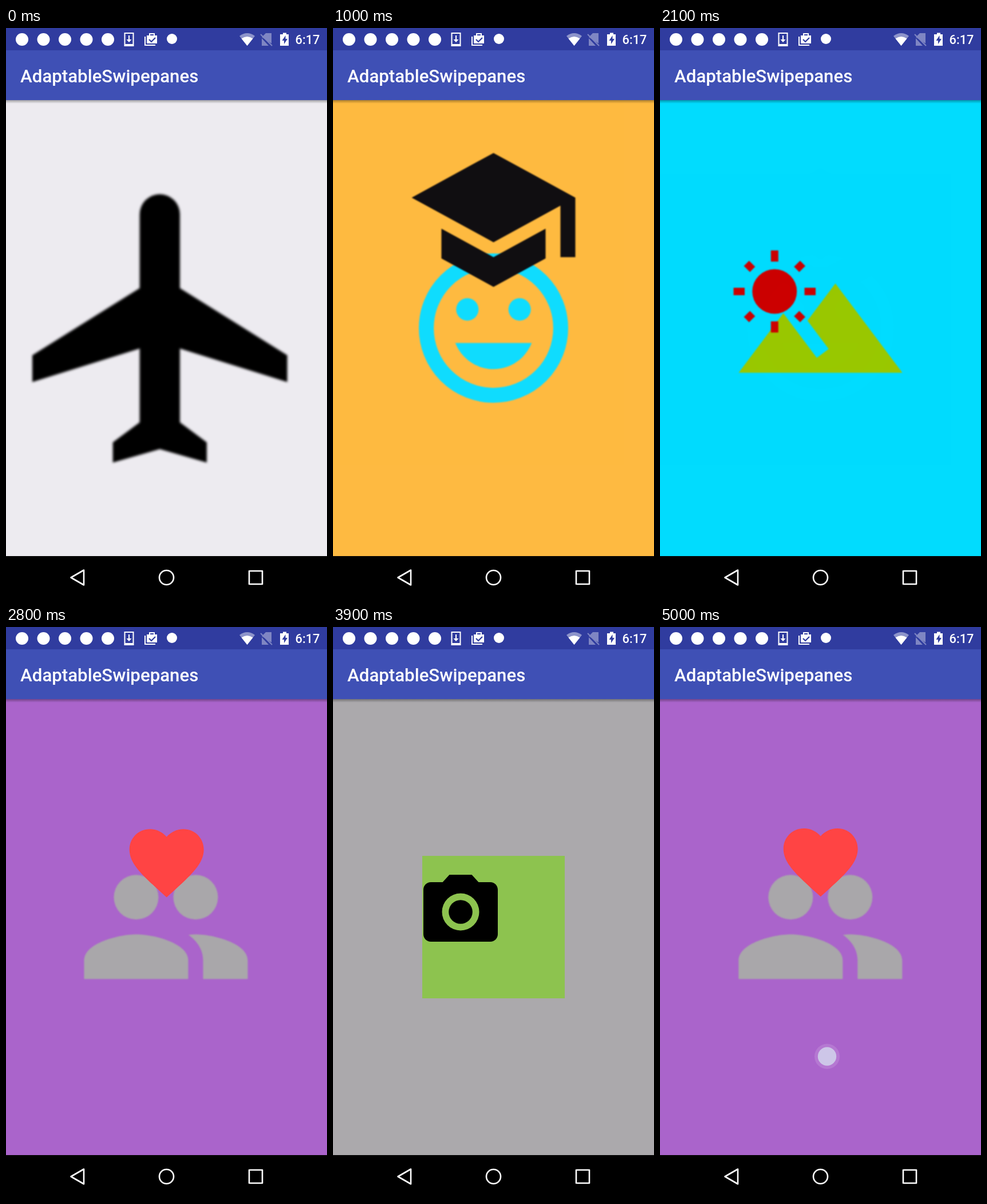
An HTML page for the animation above (5.1 s loop, 561x998 px).

```html
<!DOCTYPE html>
<html lang="en">
<head>
<meta charset="utf-8">
<title>Pager</title>
<style>
  html, body { margin: 0; width: 100%; height: 100%; overflow: hidden; background: #000; }
  svg { display: block; width: 100vw; height: 100vh; }
  text { font-family: Roboto, sans-serif; font-weight: 500; fill: #fff; }
  .soft { filter: blur(1.1px); }
  .softer { filter: blur(2px); }
  .line { fill: none; stroke: #fff; }
</style>
</head>
<body>
<svg viewBox="0 0 561 998" preserveAspectRatio="none">
  <defs>
    <linearGradient id="shade" x2="0" y2="1">
      <stop stop-opacity=".32"/>
      <stop offset="1" stop-opacity="0"/>
    </linearGradient>
    <rect id="sheet" y="126" width="561" height="797"/>
  </defs>

  <g id="plane-page">
    <use href="#sheet" fill="#edebf0"/>
    <g id="plane"><g class="softer">
      <path transform="translate(-.9 243.6) scale(23.45)" d="M21 16v-2l-8-5V3.5a1.5 1.5 0 0 0-3 0V9l-8 5v2l8-2.5V19l-2 1.5V22l3.5-1 3.5 1v-1.5L13 19v-5.5z"/>
    </g></g>
  </g>

  <g class="page">
    <use href="#sheet" fill="#ffb93b"/>
    <g class="soft" fill="#08dcff">
      <g transform="translate(123.9 367.9) scale(13.05)">
        <circle cx="12" cy="12" r="9" fill="none" stroke="#08dcff" stroke-width="2"/>
        <circle cx="8.5" cy="9.5" r="1.5"/>
        <circle cx="15.5" cy="9.5" r="1.5"/>
        <path d="M12 17.5c2.33 0 4.31-1.46 5.11-3.5H6.89c.8 2.04 2.78 3.5 5.11 3.5z"/>
      </g>
    </g>
    <g data-dy="-887"><g class="soft">
      <path fill="#09070a" transform="translate(124.5 206) scale(13)" d="M5 13.18v4L12 21l7-3.82v-4L12 17zM12 3L1 9l11 6 9-4.91V17h2V9z"/>
    </g></g>
  </g>

  <g class="page">
    <use href="#sheet" fill="#00dcff"/>
    <g class="soft">
      <path fill="#99c800" transform="translate(124.5 368.5) scale(13)" d="M14 6l-3.75 5 2.85 3.8-1.6 1.2L7 10l-6 8h22z"/>
    </g>
    <g data-dx="-561"><g class="soft">
      <g id="sun" fill="#c00" transform="translate(202.5 460.5)"><circle r="39"/></g>
    </g></g>
  </g>

  <g class="page">
    <use href="#sheet" fill="#aa64cb"/>
    <g data-dx="-561"><g class="soft" fill="#a9a7aa">
      <g transform="translate(124.3 368.3) scale(13)">
        <circle cx="8" cy="8" r="3"/>
        <circle cx="16" cy="8" r="3"/>
        <path d="M8 13c-2.33 0-7 1.17-7 3.5V19h14v-2.5c0-2.33-4.67-3.5-7-3.5z"/>
        <path d="M16 13c-.29 0-.62.02-.97.05 1.16.84 1.97 1.97 1.97 3.45V19h6v-2.5c0-2.33-4.67-3.5-7-3.5z"/>
      </g>
    </g></g>
    <g data-dy="797">
      <path fill="#f44" transform="translate(202.7 332.5) scale(6.5)" d="M12 21.35l-1.45-1.32C5.4 15.36 2 12.28 2 8.5 2 5.42 4.42 3 7.5 3c1.74 0 3.41.81 4.5 2.09C13.09 3.81 14.76 3 16.5 3 19.58 3 22 5.42 22 8.5c0 3.78-3.4 6.86-8.55 11.54z"/>
    </g>
  </g>

  <g class="page">
    <use href="#sheet" fill="#aba9ac"/>
    <rect x="156" y="400" width="249" height="249" fill="#8dc34f"/>
    <g data-dx="-561">
      <g transform="translate(145 420) scale(6.5)">
        <path d="M9 2L7.17 4H4c-1.1 0-2 .9-2 2v12c0 1.1.9 2 2 2h16c1.1 0 2-.9 2-2V6c0-1.1-.9-2-2-2h-3.17L15 2zm3 15a5 5 0 1 1 0-10 5 5 0 0 1 0 10z"/>
        <circle cx="12" cy="12" r="3.2"/>
      </g>
    </g>
  </g>

  <g id="touch">
    <circle id="halo" r="22" fill="#fff" opacity=".13"/>
    <circle id="dot" r="17.2" stroke="#65554a" stroke-width="1.5"/>
  </g>

  <rect y="126" width="561" height="6" fill="url(#shade)"/>
  <rect width="561" height="40" fill="#303c9f"/>
  <rect y="39" width="561" height="87" fill="#3f50b5"/>
  <text x="25" y="94.5" font-size="31.2">AdaptableSwipepanes</text>
  <text x="505.5" y="28" font-size="21.8">6:17</text>

  <g id="badges" fill="#fff"><circle cx="290" cy="19" r="9"/></g>
  <path class="line" stroke-width="2" d="M207.5 9h15v22h-15zM215 13v10"/>
  <path fill="#fff" d="M207 28h16v4h-16zM210.5 20h9l-4.5 5z"/>
  <path class="line" stroke-width="2" d="M243 15v15h18M251 13v-3h8v3"/>
  <path fill="#fff" d="M246 13h18v14h-18z"/>
  <path fill="none" stroke="#303c9f" stroke-width="2.2" d="M250 20l4 4 7-7"/>
  <path fill="#fff" opacity=".45" d="M421.5 31L408 14q13.500-10 27 0z"/>
  <path fill="#fff" d="M421.5 31L411.500 18.500q10-7 20 0z"/>
  <g opacity=".38">
    <path fill="#fff" d="M447 16l7-7h10v18zM447 18l12 13h-12z"/>
    <path class="line" stroke-width="2" d="M445 11l20 20"/>
  </g>
  <path fill="#fff" d="M484 8.500h6v2.500h4v20h-15v-20h5z"/>
  <path fill="#303c9f" d="M488.500 13l-6 9h3.500v6l6-9h-3.500z"/>

  <rect y="923" width="561" height="75"/>
  <g class="line" stroke-width="2.6" stroke-linejoin="round">
    <path d="M113.500 960.500L136 947.500v26z"/>
    <circle cx="280.5" cy="960.5" r="12.5"/>
    <rect x="425" y="949" width="23" height="23"/>
  </g>
</svg>
<script>
  const $ = id => document.getElementById(id);
  const NS = 'http://www.w3.org/2000/svg';
  const add = (parent, tag, attrs) => {
    const el = parent.appendChild(document.createElementNS(NS, tag));
    for (const k in attrs) el.setAttribute(k, attrs[k]);
  };
  const clamp = v => Math.min(1, Math.max(0, v));

  for (let i = 0; i < 8; i++) {
    const len = i % 2 ? 15 : 19.5;
    add($('sun'), 'rect', { x: -6.5, y: -62 - len / 2, width: 13, height: len, transform: `rotate(${i * 45})` });
  }
  for (let i = 0; i < 5; i++) add($('badges'), 'circle', { cx: 28 + i * 37.5, cy: 20, r: 11 });

  // The picture ticks at 10 fps; starts are in ticks.
  const TICK = 100, TICKS = 51;
  const drag = [0, .25, .637, .88, .97, .996, 1];
  const flick = [0, .35, .85, .9985, .9995, 1];
  const swipes = [
    { start: 6, from: 0, to: 1, path: drag, held: 3, x: 443, y: 676.5 },
    { start: 16, from: 1, to: 2, path: drag, held: 3, x: 443.5, y: 684 },
    { start: 25, from: 2, to: 3, path: flick, held: 2, x: 440, y: 690 },
    { start: 33, from: 3, to: 4, path: drag, held: 3, x: 443, y: 690 },
    { start: 44, from: 4, to: 3, path: drag, held: 3, x: 110, y: 720 },
    { start: 50, from: 3, to: 3, path: [0], held: 1, x: 292, y: 750.5, fresh: true }
  ];
  const pages = [...document.querySelectorAll('.page')].map(el => ({
    el, parts: [...el.querySelectorAll('[data-dx], [data-dy]')]
  }));

  function showTouch(s, n, p) {
    const on = s && n < s.held;
    $('touch').setAttribute('visibility', on ? 'visible' : 'hidden');
    if (!on) return;
    const x = s.x + (s.from - s.to) * p * 582;
    $('touch').setAttribute('transform', `translate(${x} ${s.y})`);
    $('halo').setAttribute('visibility', s.fresh ? 'inherit' : 'hidden');
    $('dot').setAttribute('r', s.fresh ? 16.2 : 17.2);
    $('dot').setAttribute('stroke-opacity', s.fresh ? 0 : .3);
    $('dot').setAttribute('fill', s.fresh ? '#cdc6e8' : '#f0e0ca');
  }

  function draw(now) {
    const tick = Math.floor(now / TICK) % TICKS;
    const s = swipes.filter(w => w.start <= tick).pop();
    const n = s ? tick - s.start : 0;
    const p = s ? s.path[Math.min(n, s.path.length - 1)] : 0;
    const pos = s ? s.from + (s.to - s.from) * p : 0;

    $('plane').setAttribute('transform', `translate(0 ${-1100 * pos})`);
    pages.forEach(({ el, parts }, i) => {
      const shown = clamp(pos - i), away = 1 - shown;
      el.setAttribute('opacity', shown);
      el.setAttribute('visibility', shown && pos < i + 2 ? 'visible' : 'hidden');
      for (const part of parts) {
        const { dx = 0, dy = 0 } = part.dataset;
        part.setAttribute('transform', `translate(${dx * away} ${dy * away})`);
      }
    });
    showTouch(s, n, p);
  }

  const t0 = performance.now();
  function loop() {
    draw(performance.now() - t0);
    requestAnimationFrame(loop);
  }
  loop();
</script>
</body>
</html>
```
